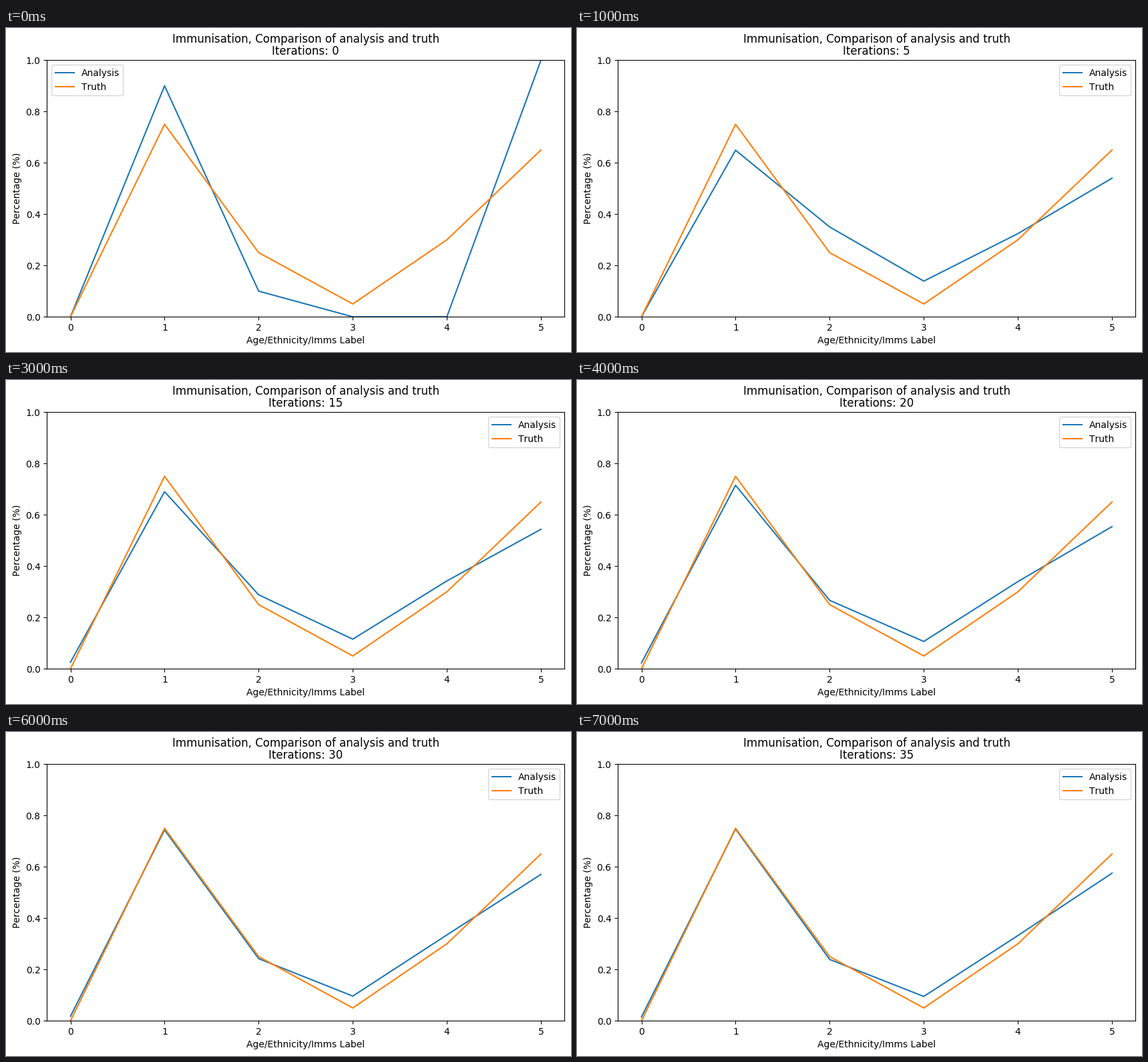
These frames come from a looping animation (846x486 px, 8 s). A matplotlib script:

```python
import numpy as np
import matplotlib.pyplot as plt
from matplotlib.animation import FuncAnimation

W, H, DPI = 846, 486, 100
FRAMES, STEP = 8, 5  # STEP: iterations per frame
SETTLE_FROM = 2

TRUTH = [0, 0.75, 0.25, 0.05, 0.30, 0.65]

# Key poses of the analysis: two jumps, then a slow settling
GUESS = [0, 0.90, 0.10, 0, 0, 1]
JUMP = [0, 0.649, 0.350, 0.139, 0.324, 0.540]
LOOSE = np.array([0.028, 0.658, 0.316, 0.127, 0.345, 0.532])
SETTLED = np.array([0.015, 0.747, 0.239, 0.095, 0.332, 0.575])
EASE = np.array([1, 2, 2, 2, 1, 1.4])  # ease-out power of each label


def analysis(i):
    if i < SETTLE_FROM:
        return (GUESS, JUMP)[i]
    t = (i - SETTLE_FROM) / (FRAMES - 1 - SETTLE_FROM)
    return SETTLED + (LOOSE - SETTLED) * (1 - t) ** EASE


plt.rcParams["text.kerning_factor"] = 6
fig = plt.figure(figsize=(W / DPI, H / DPI), dpi=DPI)
ax = fig.add_axes([61.28 / W, 52.8 / H, 775 / W, 385 / H])


def draw(i):
    ax.clear()
    ax.plot(analysis(i), label="Analysis")
    ax.plot(TRUTH, label="Truth")
    ax.set_ylim(0, 1)
    ax.set_xlabel("Age/Ethnicity/Imms Label")
    ax.set_ylabel("Percentage (%)")
    ax.set_title("Immunisation, Comparison of analysis and truth\n"
                 f"Iterations: {i * STEP}", linespacing=1)
    ax.legend(loc="upper right" if i else "upper left")


anim = FuncAnimation(fig, draw, frames=FRAMES, interval=1000,
                     init_func=lambda: None, repeat=True, repeat_delay=0)
plt.show()
```
